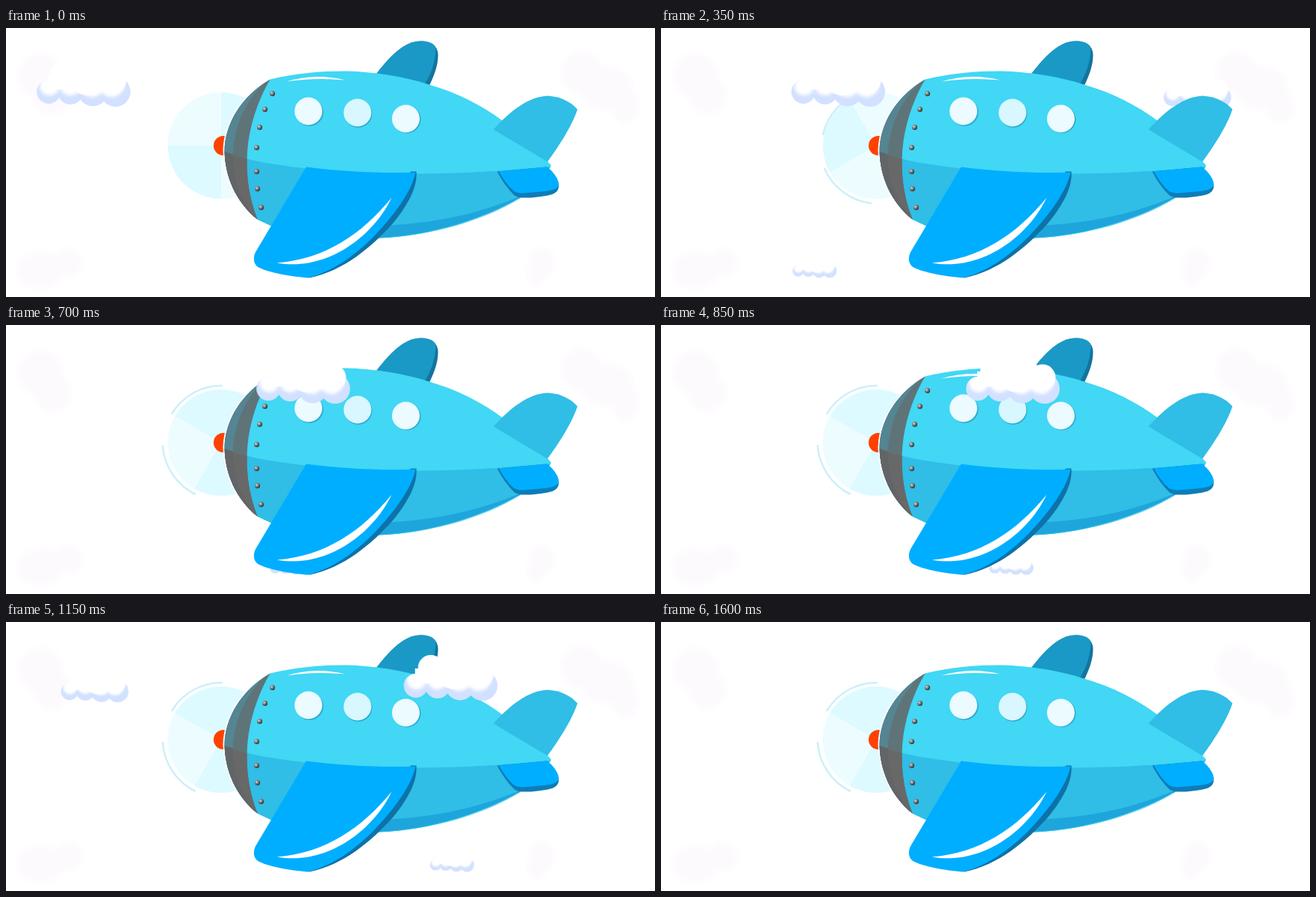
Animation of 866 by 359 pixels, one loop 1650 ms. Source, as an HTML page:

```html
<!DOCTYPE html>
<html lang="en">
<head>
<meta charset="utf-8">
<title>Plane in the clouds</title>
<style>
  html, body { margin: 0; width: 100%; height: 100%; overflow: hidden; background: #fff; }
  svg { display: block; width: 100vw; height: 100vh; }

  /* Everything moves in 50 ms ticks, 33 ticks per loop. */
  .big, .mid, .small { animation: 1650ms infinite; }
  .big { animation-name: big; }
  .mid { animation-name: mid; }
  .small { animation-name: small; }
  .disc { transform-origin: 287px 157px; animation: spin 150ms steps(3) infinite; }
  .arc { animation: blink 150ms step-end infinite; }
  .a1 { animation-delay: -100ms; }
  .a2 { animation-delay: -50ms; }

  @keyframes spin { from { transform: rotate(0deg); } to { transform: rotate(180deg); } }
  @keyframes blink { 0% { opacity: 1; } 33.3333%, 100% { opacity: 0; } }

  @keyframes big {
    0% { transform: translate(41px, 34px); animation-timing-function: steps(4); }
    12.1212% { transform: translate(111px, 34px); animation-timing-function: steps(6); }
    30.303% { transform: translate(237px, 34px); animation-timing-function: steps(7); }
    51.5151% { transform: translate(407px, 34px); animation-timing-function: steps(4); }
    63.6363% { transform: translate(476px, 34px); animation-timing-function: steps(5); }
    78.7878% { transform: translate(613px, 34px); animation-timing-function: steps(6); }
    96.9695% { transform: translate(769px, 34px); animation-timing-function: step-end; }
    96.9696%, 100% { transform: translate(900px, 34px); }
  }
  @keyframes mid {
    0% { transform: translate(381px, 56px); animation-timing-function: steps(4); }
    12.1212% { transform: translate(565px, 56px); animation-timing-function: steps(4); }
    24.2423% { transform: translate(706px, 56px); animation-timing-function: step-end; }
    24.2424% { transform: translate(-200px, 56px); animation-timing-function: step-end; }
    63.6363% { transform: translate(21px, 56px); animation-timing-function: steps(5); }
    78.7878% { transform: translate(152px, 56px); animation-timing-function: steps(6); }
    96.9696% { transform: translate(335px, 56px); animation-timing-function: step-end; }
    100% { transform: translate(381px, 56px); }
  }
  @keyframes small {
    0% { transform: translate(-200px, 300px); animation-timing-function: step-end; }
    3.0303% { transform: translate(52px, 300px); animation-timing-function: steps(3); }
    12.1212% { transform: translate(114px, 300px); animation-timing-function: steps(6); }
    30.303% { transform: translate(237px, 300px); animation-timing-function: steps(7); }
    51.5151% { transform: translate(438px, 300px); animation-timing-function: steps(4); }
    63.6363% { transform: translate(520px, 300px); animation-timing-function: steps(5); }
    78.7878% { transform: translate(634px, 300px); animation-timing-function: steps(6); }
    96.9695% { transform: translate(772px, 300px); animation-timing-function: step-end; }
    96.9696%, 100% { transform: translate(900px, 300px); }
  }
</style>
</head>
<body>
<svg viewBox="0 0 866 359" preserveAspectRatio="none">
  <defs>
    <radialGradient id="steel" cx=".35" cy=".35" r=".65">
      <stop offset="0" stop-color="#d8d8d8"/>
      <stop offset=".5" stop-color="#7c7c7c"/>
      <stop offset="1" stop-color="#333"/>
    </radialGradient>
    <filter id="soft"><feGaussianBlur stdDeviation="3"/></filter>
    <filter id="glow"><feGaussianBlur stdDeviation="2"/></filter>

    <g id="puffs">
      <circle cx="16" cy="51" r="16"/>
      <circle cx="45" cy="51" r="17"/>
      <circle cx="75" cy="51" r="19.5"/>
      <circle cx="105" cy="51" r="20"/>
    </g>
    <clipPath id="inPuffs">
      <circle cx="16" cy="51" r="16"/>
      <circle cx="45" cy="51" r="17"/>
      <circle cx="75" cy="51" r="19.5"/>
      <circle cx="105" cy="51" r="20"/>
    </clipPath>
    <g id="cloud">
      <use href="#puffs" fill="#d2e1ff"/>
      <g fill="#fff">
        <circle cx="36" cy="27" r="17"/>
        <circle cx="68" cy="28" r="28"/>
        <circle cx="102" cy="36" r="17.5"/>
        <rect x="15" y="28" width="92" height="20"/>
      </g>
      <g clip-path="url(#inPuffs)">
        <g fill="#fff" filter="url(#glow)">
          <circle cx="17" cy="43" r="13"/>
          <circle cx="45" cy="42" r="14"/>
          <circle cx="74" cy="41" r="17"/>
          <circle cx="100" cy="41" r="17"/>
        </g>
      </g>
    </g>
    <circle id="rivet" r="3.5" fill="url(#steel)"/>

    <path id="body" d="M291 163C292 127 313 91 352 68C385 60 420 57 452 57C492 58 530 64 564 75C602 86 635 103 663 124C687 142 709 162 727 183C714 206 700 217 683 228C640 254 570 277 497 280C440 282 390 277 352 263L335 255C306 231 292 199 291 163Z"/>
    <path id="nose" d="M352 68C313 91 292 127 291 163C292 199 306 231 335 255C322 222 318 186 323 150C328 118 339 90 352 68Z"/>
    <path id="lower" d="M285 162C312 175 350 181 400 187C450 192 500 196 547 194C610 194 670 190 730 184V300H285Z"/>
    <clipPath id="inBody"><use href="#body"/></clipPath>
    <clipPath id="inNose"><use href="#nose"/></clipPath>
  </defs>

  <rect width="866" height="359" fill="#fff"/>

  <g fill="#fdfafd" filter="url(#soft)">
    <ellipse cx="46" cy="64" rx="30" ry="30"/>
    <ellipse cx="62" cy="90" rx="25" ry="27"/>
    <ellipse cx="768" cy="60" rx="28" ry="29"/>
    <ellipse cx="800" cy="80" rx="37" ry="29"/>
    <ellipse cx="826" cy="104" rx="19" ry="24"/>
    <ellipse cx="46" cy="323" rx="32" ry="25"/>
    <ellipse cx="83" cy="313" rx="20" ry="19"/>
    <ellipse cx="715" cy="313" rx="18" ry="20"/>
    <ellipse cx="708" cy="328" rx="13" ry="16"/>
  </g>

  <g class="mid"><use href="#cloud" transform="scale(.72)"/></g>
  <g class="small"><use href="#cloud" transform="scale(.472)"/></g>

  <!-- propeller -->
  <g class="disc">
    <circle cx="287" cy="157" r="71" fill="#dcfaff"/>
    <path d="M287 157H216A71 71 0 0 1 287 86ZM287 157H358A71 71 0 0 1 287 228Z" fill="#edfdff"/>
  </g>
  <g fill="none" stroke="#cbf0f9" stroke-width="2.500">
    <path class="arc a1" d="M216 143A74 74 0 0 1 270 86M218 187A78 78 0 0 0 281 234"/>
    <path class="arc a2" d="M221 119A77 77 0 0 1 289 81M209 160A78 78 0 0 0 253 226"/>
  </g>
  <circle cx="290" cy="157" r="13" fill="#ff4100"/>

  <g transform="translate(.5 .5)">
    <!-- rear fin -->
    <path d="M492 63C511 38 530 17 553 17C569 17 576 25 576 36C576 49 571 63 564 77Z" fill="#13749f"/>
    <path d="M492 63C511 38 530 17 553 17C567 17 573 22 573 28C572 46 567 60 558 75Z" fill="#1a99c6"/>

    <!-- fuselage -->
    <path d="M352 68C313 91 292 127 291 163C292 199 306 231 335 255" fill="none" stroke="#fff" stroke-width="4"/>
    <use href="#body" fill="#41d7f5"/>
    <g clip-path="url(#inBody)">
      <use href="#lower" fill="#30bde6"/>
      <path d="M480 264C560 263 630 249 690 222L683 228C640 252 570 276 497 279L470 282Z" fill="#1da5dc"/>
      <path d="M520 279C580 272 640 252 683 227L690 240L560 290Z" fill="#6fd5ee"/>
    </g>
    <use href="#nose" fill="#5f7479"/>
    <g clip-path="url(#inNose)">
      <path d="M352 66C322 91 304 126 302 170H280V60Z" fill="#558592"/>
      <use href="#lower" fill="#686868"/>
      <path d="M280 161L302 168C302 203 314 232 335 256H280Z" fill="#626567"/>
    </g>

    <use href="#rivet" x="355" y="87"/>
    <use href="#rivet" x="345" y="108"/>
    <use href="#rivet" x="338" y="132"/>
    <use href="#rivet" x="334" y="159"/>
    <use href="#rivet" x="334" y="191"/>
    <use href="#rivet" x="335" y="214"/>
    <use href="#rivet" x="340" y="239"/>

    <g fill="#2fa9d0">
      <circle cx="404.500" cy="112" r="18.500"/>
      <circle cx="469.500" cy="114" r="18.500"/>
      <circle cx="534.500" cy="121.500" r="18.500"/>
    </g>
    <g fill="#ebfbff">
      <circle cx="403" cy="110.500" r="18.500"/>
      <circle cx="468.500" cy="112.500" r="18.500" fill="#d8f7fe"/>
      <circle cx="533" cy="120.500" r="18.500"/>
    </g>
    <path d="M374 71Q412 59 452 69Q412 65 374 71Z" fill="#fff"/>

    <!-- wing -->
    <path d="M540 191H547C549 212 535 237 515 261C488 291 450 324 404 333L390 325Z" fill="#0e72a8"/>
    <path d="M400 185C448 191 500 194 546 192C541 217 518 249 490 278C463 305 434 325 402 333C380 331 348 326 335 318C330 314 328 305 334 296Z" fill="#00aeff"/>
    <path d="M361 313C425 308 474 275 514 226C490 277 428 325 361 313Z" fill="#fff"/>
  </g>

  <g class="big"><use href="#cloud"/></g>

  <!-- tail -->
  <g transform="translate(.5 .5)">
    <path d="M655 191L721 185C731 192 738 204 737 212C735 222 726 223 700 226C691 226 684 227 678 223C669 214 661 203 655 191Z" fill="#0e7cb8"/>
    <path d="M657 191L721 185C731 192 738 203 737 209C734 217 722 217 700 219C691 220 684 221 677 217C669 210 663 201 657 191Z" fill="#00aeff"/>
    <path d="M650 135C673 109 698 91 722 90C740 91 753 98 762 108C755 130 736 159 722 178Z" fill="#30bde6"/>
  </g>
</svg>
</body>
</html>
```
